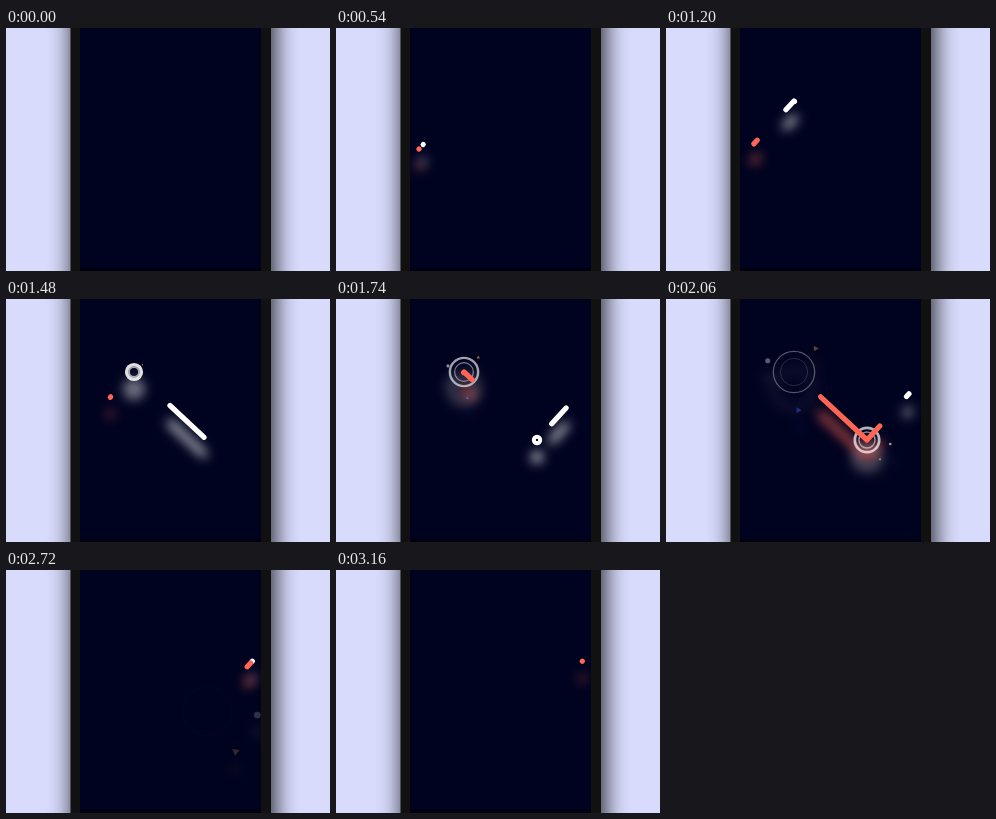
Write an HTML page that moves like this. It is 324 px wide and 243 px high and loops after 3180 ms.

```html
<!DOCTYPE html>
<html lang="en">
<head>
<meta charset="utf-8">
<title>Sparkline trail</title>
<style>
  html, body { margin: 0; width: 100%; height: 100%; overflow: hidden; background: #d8dbfc; }
  svg { display: block; width: 100vw; height: 100vh; }
  .trail { fill: none; stroke-width: 5.2; stroke-linecap: round; stroke-linejoin: round; }
  .ring { fill: none; stroke: #fff; }
</style>
</head>
<body>
<svg viewBox="0 0 324 243">
  <defs>
    <filter id="soft" filterUnits="userSpaceOnUse" x="-60" y="-160" width="450" height="560">
      <feGaussianBlur stdDeviation="12"/>
    </filter>
    <filter id="glow" filterUnits="userSpaceOnUse" x="30" y="0" width="270" height="243" color-interpolation-filters="sRGB">
      <feGaussianBlur stdDeviation="6"/>
      <feOffset dy="16.5" result="shade"/>
      <feMerge><feMergeNode in="shade"/><feMergeNode in="SourceGraphic"/></feMerge>
    </filter>
    <clipPath id="screen"><rect x="74" y="0" width="181" height="243"/></clipPath>
  </defs>
  <rect width="324" height="243" fill="#d8dbfc"/>
  <rect x="67" y="-80" width="201" height="400" opacity=".88" filter="url(#soft)"/>
  <rect x="64.5" width="200.5" height="243" fill="#111"/>
  <rect x="74" width="181" height="243" fill="#000320"/>
  <rect x="74" y="240" width="181" height="3" fill="#000010"/>
  <g clip-path="url(#screen)">
    <g filter="url(#glow)">
      <g id="bursts"></g>
      <path id="white" class="trail" stroke="#fff"/>
      <path id="red" class="trail" stroke="#ff6554"/>
    </g>
  </g>
</svg>
<script>
const LOOP = 3180;
const points = [[83, 121], [128, 73], [201, 141], [246.3, 91.2]];
const white = document.getElementById('white');
const red = document.getElementById('red');
const bursts = document.getElementById('bursts');
for (const trail of [white, red]) trail.setAttribute('d', 'M' + points.join('L'));
const total = white.getTotalLength();

const clamp = (v, lo = 0, hi = 1) => Math.min(hi, Math.max(lo, v));

// cubic-bezier(x1, 0, x2, 1)
function ease(x, x1, x2) {
  x = clamp(x);
  let lo = 0, hi = 1;
  for (let i = 0; i < 24; i++) {
    const u = (lo + hi) / 2, v = 1 - u;
    if (3 * u * v * v * x1 + 3 * u * u * v * x2 + u ** 3 < x) lo = u; else hi = u;
  }
  return lo * lo * (3 - 2 * lo);
}

// Smooth monotone curve through [time, value] keys
function follow(keys, t) {
  const last = keys.length - 1;
  if (t <= keys[0][0]) return keys[0][1];
  if (t >= keys[last][0]) return keys[last][1];
  const i = keys.findIndex(k => k[0] > t) - 1;
  const rate = j => (keys[j + 1][1] - keys[j][1]) / (keys[j + 1][0] - keys[j][0]);
  const slope = j => {
    if (j === 0 || j === last) return 0;
    const a = rate(j - 1), b = rate(j);
    return 2 * a * b / (a + b);
  };
  const [t0, v0] = keys[i], [t1, v1] = keys[i + 1];
  const h = t1 - t0, u = (t - t0) / h, v = 1 - u;
  return v0 * v * v * (1 + 2 * u) + v1 * u * u * (3 - 2 * u)
    + h * u * v * (slope(i) * v - slope(i + 1) * u);
}

const redTail = [[520, 0], [1200, .03], [1740, .279], [2060, .438], [2400, .88], [3030, 1]];

function drawTrail(trail, visible, tail, head) {
  trail.style.display = visible ? '' : 'none';
  trail.setAttribute('stroke-dasharray', `${Math.max(.01, (head - tail) * total)} 999`);
  trail.setAttribute('stroke-dashoffset', -Math.min(tail * total, total - .02));
}

function add(tag, attrs) {
  const el = document.createElementNS('http://www.w3.org/2000/svg', tag);
  for (const key in attrs) el.setAttribute(key, attrs[key]);
  return bursts.appendChild(el);
}

// Particle: start offset and velocity from the burst centre
const burstSpecs = [
  { at: points[1], start: 1240, bits: [
    { from: [0, 2], speed: [-.032, -.0162], color: '#dcdcec' },
    { from: [3, -.5], speed: [.0225, -.028], color: '#f0a040', tri: true },
    { from: [2, 7], speed: [.0028, .038], color: '#4a6cf0', tri: true }] },
  { at: points[2], start: 1640, bits: [
    { from: [6, 4], speed: [.041, 0], color: '#dcdcec' },
    { from: [3, 5.5], speed: [.0237, .0325], color: '#f5a742', tri: true }] }
];
for (const burst of burstSpecs) {
  const [cx, cy] = burst.at;
  burst.rings = [1, .66].map(scale => ({ scale, el: add('circle', { cx, cy, class: 'ring' }) }));
  for (const bit of burst.bits)
    bit.el = bit.tri
      ? add('path', { d: 'M1 0L-.5 .866V-.866Z', fill: bit.color })
      : add('circle', { r: 1, fill: bit.color });
}

function drawBurst({ at, start, rings, bits }, t) {
  const age = t - start;
  for (const { scale, el } of rings) {
    const fade = clamp(1.1 - age / 1060) * (scale < 1 ? .75 : 1);
    const width = (4.3 - age * .0037) * (scale < 1 ? .5 : 1);
    el.style.display = age > 0 && width > 0 && fade > 0 ? '' : 'none';
    el.setAttribute('r', Math.max(0, scale * (.033 * age - 9.5e-6 * age * age)));
    el.setAttribute('stroke-width', Math.max(0, width));
    el.setAttribute('opacity', fade);
  }
  for (const { from, speed, tri, el } of bits) {
    const fade = clamp(1 - age / 1380);
    el.style.display = age > 120 && fade > 0 ? '' : 'none';
    const [x, y] = [0, 1].map(k => at[k] + from[k] + speed[k] * age);
    const size = age * (tri ? .004 : .0031);
    const turn = tri ? (820 - age) * .088 : 0;
    el.setAttribute('transform', `translate(${x} ${y}) rotate(${turn}) scale(${size})`);
    el.setAttribute('opacity', fade);
  }
}

function render(t) {
  const w = (t - 60) / 2360, r = (t - 535) / 2490;
  drawTrail(white, t >= 60 && t < 2900, ease(w, .81, .468), ease(w, .82, .315));
  drawTrail(red, t >= 520, follow(redTail, t), ease(r, .82, .251));
  for (const burst of burstSpecs) drawBurst(burst, t);
}

function tick() {
  render(performance.now() % LOOP);
  requestAnimationFrame(tick);
}
tick();
</script>
</body>
</html>
```
